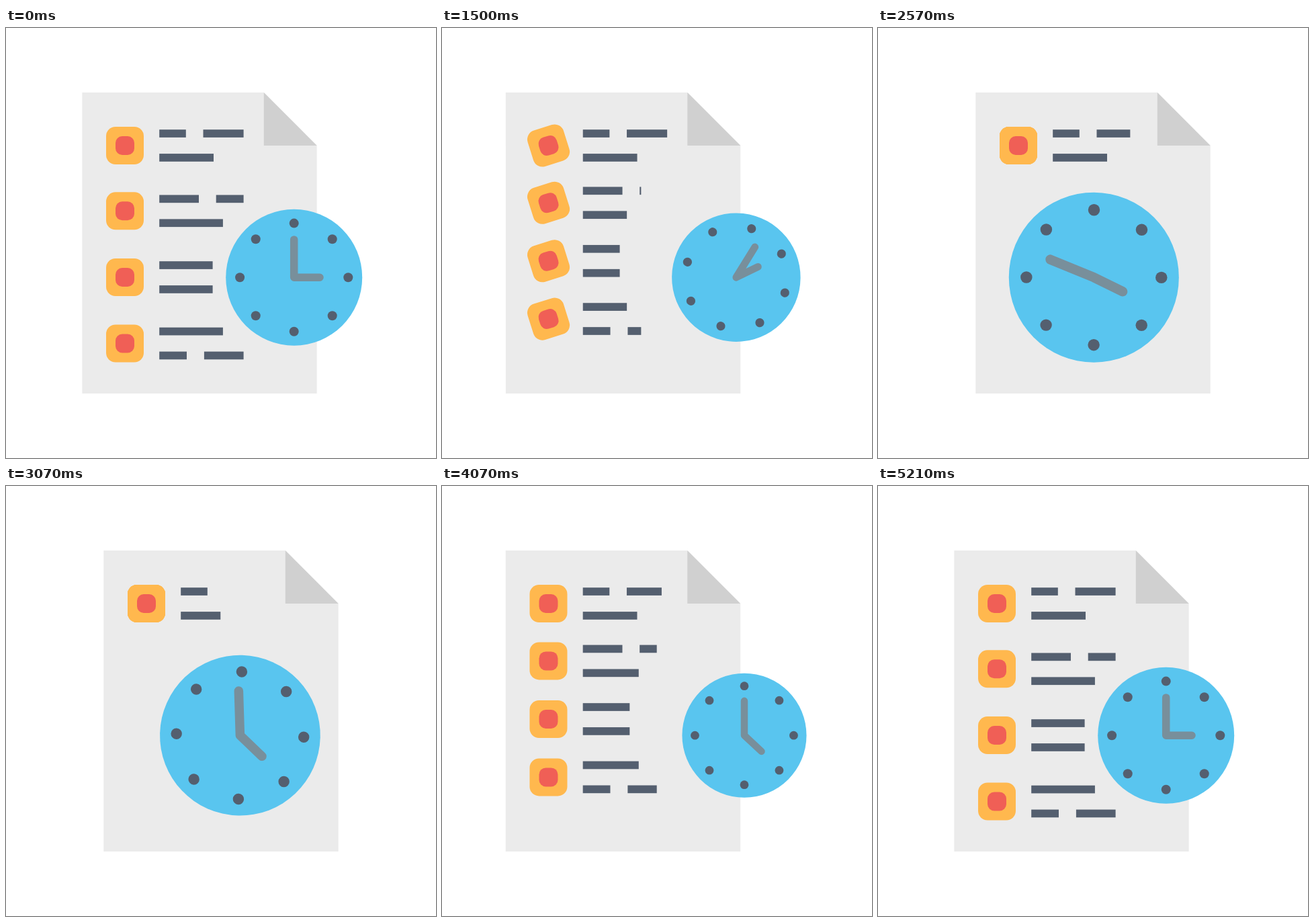
Write an HTML page with a canvas that moves like this. It is 640x640 px and loops after 6 s.

```html
<!DOCTYPE html>
<html lang="en">
<head>
<meta charset="utf-8">
<title>Schedule</title>
<style>
  html, body { margin: 0; width: 100%; height: 100%; overflow: hidden; background: #fff; }
  canvas { display: block; width: 640px; height: 640px; }
</style>
</head>
<body>
<canvas id="stage" width="640" height="640"></canvas>
<script>
const ctx = document.getElementById('stage').getContext('2d');
const LOOP = 6000, FPS = 14, LAST = 73;
const PAPER = '#ebebeb', FOLD = '#d0d0d0', INK = '#545f6f', ORANGE = '#ffb84e',
      RED = '#f05f56', BLUE = '#59c5ef', HAND = '#788f9b';
const RAD = Math.PI / 180;
const LINE_W = 125.4;

// Each row: vertical offset and two lines made of [from, to] segments.
const ROWS = [
  { y: 0, lines: [[[0, 39.6], [65.3, LINE_W]], [[0, 80.8]]] },
  { y: 97.3, lines: [[[0, 58.8], [84.5, LINE_W]], [[0, 94.7]]] },
  { y: 196, lines: [[[0, 79.4]], [[0, 79.4]]] },
  { y: 294.5, lines: [[[0, 94.7]], [[0, 40.8], [66.7, LINE_W]]] }
];

// cubic-bezier(.5, 0, .5, 1) between two times
function ease(time, from, to) {
  const x = (time - from) / (to - from);
  if (x <= 0) return 0;
  if (x >= 1) return 1;
  let lo = 0, hi = 1, s = 0.5;
  for (let i = 0; i < 24; i++) {
    s = (lo + hi) / 2;
    if (1.5 * s * (1 - s) + s * s * s < x) lo = s; else hi = s;
  }
  return s * s * (3 - 2 * s);
}

function pose(time) {
  const e = (from, to) => ease(time, from, to);
  const ready = e(30, 1180), fold = e(1171, 2399), unfold = e(3171, 4399);
  const back = e(2411, 4361), rest = e(4385, 5214), spin = e(1171, 3237);
  return {
    shift: 25.6 * (rest - ready) + 57.6 * (fold - unfold),
    spread: 1 - fold + unfold,
    trim: 1 - e(1171, 1993) + unfold,
    firstWidth: LINE_W * (1 - 0.53 * (e(2350, 3100) - unfold)),
    tilt: 20 * (fold - ready),
    clockX: 428.7 + 25.8 * (ready - rest) + 134.5 * (back - fold),
    scale: 1 + 0.1 * (rest - ready) + 0.35 * (fold - back),
    face: 20 * (ready - fold) + 1.55 * (e(2411, 3171) - e(3171, 4071)),
    minute: 360 * spin,
    hour: 90 - 47 * ready + 90 * spin - 43 * rest
  };
}

function poly(color, ...points) {
  ctx.fillStyle = color;
  ctx.beginPath();
  points.forEach(([x, y]) => ctx.lineTo(x, y));
  ctx.fill();
}

function disc(color, x, y, r) {
  ctx.fillStyle = color;
  ctx.beginPath();
  ctx.arc(x, y, r, 0, 2 * Math.PI);
  ctx.fill();
}

function tile(color, size, radius) {
  ctx.fillStyle = color;
  ctx.beginPath();
  ctx.roundRect(-size / 2, -size / 2, size, size, radius);
  ctx.fill();
}

function drawPaper() {
  poly(PAPER, [113.3, 96], [383.8, 96], [462.7, 175], [462.7, 544], [113.3, 544]);
  poly(FOLD, [383.8, 96], [462.7, 175], [383.8, 175]);
}

function drawRow(row, p) {
  const y = 175 + row.y * p.spread;
  ctx.fillStyle = INK;
  row.lines.forEach((line, i) => {
    const full = line[line.length - 1][1];
    const limit = row.y ? full * p.trim : p.firstWidth;
    for (const [from, to] of line) {
      const w = Math.min(to, limit) - from;
      if (w > 0) ctx.fillRect(228.2 + from, y - 23.8 + i * 35.9, w, 11.7);
    }
  });
  ctx.save();
  ctx.translate(177, y);
  ctx.rotate(p.tilt * RAD);
  tile(ORANGE, 56, 14);
  tile(RED, 28, 10);
  ctx.restore();
}

function drawClock(p) {
  ctx.save();
  ctx.translate(p.clockX, 371.2);
  ctx.scale(p.scale, p.scale);
  ctx.rotate(p.face * RAD);
  disc(BLUE, 0, 0, 101.5);
  for (let i = 0; i < 8; i++) {
    const a = i * Math.PI / 4;
    disc(INK, 80.6 * Math.sin(a), -80.6 * Math.cos(a), 7);
  }
  const tip = (deg, len) => [len * Math.sin(deg * RAD), -len * Math.cos(deg * RAD)];
  ctx.strokeStyle = HAND;
  ctx.lineWidth = 11.5;
  ctx.lineCap = ctx.lineJoin = 'round';
  ctx.beginPath();
  ctx.moveTo(...tip(p.minute, 56.3));
  ctx.lineTo(0, 0);
  ctx.lineTo(...tip(p.hour, 38.3));
  ctx.stroke();
  ctx.restore();
}

function draw(time) {
  const p = pose(time);
  ctx.fillStyle = '#fff';
  ctx.fillRect(0, 0, 640, 640);
  ctx.save();
  ctx.translate(p.shift, 0);
  drawPaper();
  for (let i = ROWS.length - 1; i >= 0; i--) drawRow(ROWS[i], p);
  ctx.restore();
  drawClock(p);
}

const start = performance.now();
function tick() {
  const t = (performance.now() - start) % LOOP;
  // steps at 14 per second, rounded to 10 ms, then a hold
  const step = Math.min(LAST, Math.floor((t + 4.5) * FPS / 1000));
  draw(step * 1000 / FPS);
  requestAnimationFrame(tick);
}
tick();
</script>
</body>
</html>
```
